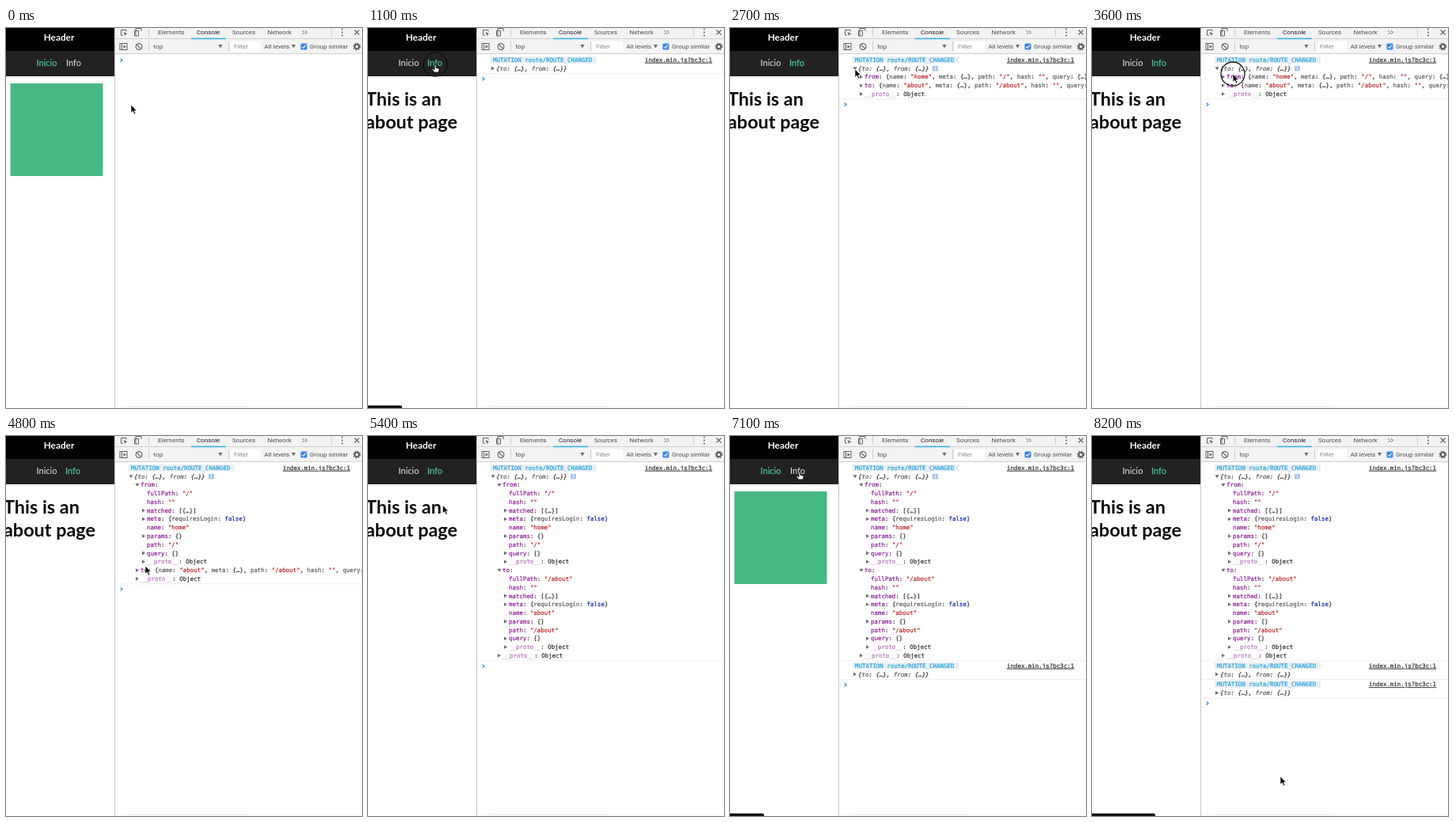
An HTML page for the animation above (8.3 s loop, 450 by 480 pixels).

```html
<!DOCTYPE html>
<html lang="es">
<head>
<meta charset="utf-8">
<title>Route log</title>
<style>
html, body { margin: 0; width: 100%; height: 100%; overflow: hidden; background: #fff; }
svg { display: block; width: 450px; height: 480px; }
text { white-space: pre; }
.page { font-family: Lato, sans-serif; font-size: 11px; }
.tools { font-family: Roboto, sans-serif; font-size: 8.1px; fill: #4a4e52; }
.log { font-family: "DejaVu Sans Mono", monospace; font-size: 7.45px; }
.log text { fill: #262626; stroke: #262626; stroke-width: .16; }
</style>
</head>
<body>
<svg viewBox="0 0 450 480" xmlns="http://www.w3.org/2000/svg">
  <rect width="450" height="480" fill="#fff"/>
  <g class="page">
    <rect width="137" height="29" fill="#000"/>
    <rect y="29" width="137" height="32" fill="#222"/>
    <text x="67" y="16" text-anchor="middle" font-size="11.8" font-weight="700" fill="#fff">Header</text>
    <text id="home" x="38.5" y="48.3">Inicio</text>
    <text id="about" y="48.3">Info</text>
    <rect id="logo" x="5.5" y="70" width="117" height="117" fill="#47b784"/>
    <g id="title" font-size="23.4" font-weight="700" fill="#080808">
      <text x="-3" y="97.5">This is an</text>
      <text x="-3" y="126.8">about page</text>
    </g>
    <path id="status" fill="#111"/>
  </g>
  <rect x="138" width="312" height="32" fill="#f3f3f3"/>
  <path d="M138 13.5H450M138 32.5H450" stroke="#cfcfcf"/>
  <path d="M137.5 0V480" stroke="#c8c8c8"/>
  <path d="M138 478.5H450" stroke="#f2f2f2"/>
  <path d="M153 478.5H305" stroke="#e6e6e6"/>
  <g class="tools">
    <path d="M180.5 1V11M411.5 1V11M180.5 17V29M281.5 17V29" stroke="#ccc"/>
    <rect x="234" y="12.6" width="44" height="1.6" fill="#3fb0e6"/>
    <text x="192" y="8.4">Elements</text>
    <text x="241" y="8.4" fill="#222">Console</text>
    <text x="286" y="8.4">Sources</text>
    <text x="330.5" y="8.4">Network</text>
    <rect x="284" y="17" width="38" height="13" fill="#fff"/>
    <text x="186.5" y="26.2">top</text>
    <text x="288" y="26.2" fill="#888">Filter</text>
    <text x="326.5" y="26.2">All levels</text>
    <text x="384" y="26.2">Group similar</text>
    <path d="M268.5 21h5l-2.5 4.5zM361 21h5l-2.5 4.5z" fill="#6a6a6a"/>
    <rect x="372.5" y="19.5" width="8" height="8" rx="1.5" fill="#3b86e8"/>
    <path d="M374.4 23.6l1.6 1.7 2.8-3.6" fill="none" stroke="#fff" stroke-width="1.1"/>
    <g fill="none" stroke="#606367">
      <path d="M152 2.5H145.5V9H148M152 2.5V4.5M164 9.5V.5H171V4M162.5 3.5H167.5V10H162.5Z"/>
      <path d="M374.5 3l2.5 2.5-2.5 2.5M378 3l2.5 2.5-2.5 2.5"/>
      <path d="M440.5 2.5l6 6M446.5 2.5l-6 6" stroke-width="1.2"/>
      <rect x="144" y="19.5" width="9" height="8"/>
      <path d="M146.5 19.5V27.5"/>
      <circle cx="168" cy="23.5" r="3.9" stroke-width="1.2"/>
      <path d="M165.3 20.8l5.4 5.4" stroke-width="1.2"/>
      <circle cx="443.5" cy="23.5" r="2.7" stroke-width="2"/>
      <circle cx="443.5" cy="23.5" r="4.2" stroke-width="1.4" stroke-dasharray="1.65"/>
    </g>
    <path d="M148.5 5l5 2.2-2.2.7-.8 2.2zM148.5 21.5l3.5 2-3.5 2z" fill="#606367"/>
    <path d="M425 1.5h.01M425 5.5h.01M425 9.5h.01" stroke="#606367" stroke-width="2" stroke-linecap="round"/>
  </g>
  <g id="log" class="log"></g>
  <circle id="ring" r="15" fill="none" stroke="#111" stroke-width="1.3"/>
  <path id="arrow" d="M0 0V10.2L2.4 8 4.2 12 5.9 11.2 4.2 7.4H7.3Z" fill="#000" stroke="#fff" stroke-width=".7"/>
  <path id="hand" d="M-1 .8Q0-.6 1 .8V4.3L4.2 5Q5.3 5.3 5 6.6L4.2 10H-1.2L-3.8 6.5Q-3.9 5.2-2.6 5.5L-1 6.8Z" fill="#fff" stroke="#111" stroke-width=".9"/>
</svg>
<script>
const LOOP = 8300, STEP = 100, PITCH = 10.78;
const el = id => document.getElementById(id);
const show = (node, on) => node.setAttribute("display", on ? "inline" : "none");

// Pointer stops: arrival time, departure time, x, y
const stops = [
  [0, 300, 158, 97], [900, 1250, 85, 46], [1800, 2700, 158, 52],
  [3300, 3900, 178, 58], [4700, 5100, 176, 164], [5600, 6500, 50, 46],
  [7000, 7500, 88, 45], [8100, LOOP, 238, 430]
];
const presses = [1000, 2300, 3500, 4900, 5600, 7200];
const [GO_INFO, OPEN_LOG, OPEN_FROM, OPEN_TO, GO_HOME, GO_BACK] = [1100, 2400, 3700, 5000, 5700, 7300];

const ease = u => u * u * (3 - 2 * u);

function pointer(t) {
  let i = stops.length - 1;
  while (stops[i][0] > t) i--;
  const [, leave, x, y] = stops[i], next = stops[i + 1];
  if (t <= leave || !next) return [x, y];
  const k = ease((t - leave) / (next[0] - leave));
  return [x + (next[2] - x) * k, y + (next[3] - y) * k];
}

const span = (s, color) => `<tspan fill="${color}" stroke="${color}">${s}</tspan>`;

function paint(s, keyed) {
  return s.replace(/"[^"]*"|\bfalse\b|\w+(?=:)/g, (m, at) => {
    if (m[0] === '"') return span(m, "#b81c20");
    if (m === "false") return span(m, "#0d22aa");
    if (m === "__proto__") return span(m, "#b46fba");
    return span(m, keyed && at === 0 ? "#881391" : "#565656");
  });
}

function marker(x, y, open) {
  const d = open ? `M${x - 0.5} ${y - 1.8}h5l-2.5 4z` : `M${x} ${y - 2.4}v4.8l4-2.4z`;
  return `<path d="${d}" fill="#6e6e6e"/>`;
}

// mark: 0 none, 1 closed, 2 open
function line(level, y, s, mark) {
  const x = 162 + level * 8;
  const style = level ? "" : ' font-style="italic"';
  return (mark ? marker(x - 6, y, mark === 2) : "") +
    `<text x="${x}" y="${y + 2.6}"${style}>${paint(s, level > 0)}</text>`;
}

function routeRows(key, name, path, open) {
  if (!open) return [[1, `${key}: {name: "${name}", meta: {…}, path: "${path}", hash: "", query: {…}}`, 1]];
  return [
    [1, `${key}:`, 2], [2, `fullPath: "${path}"`, 0], [2, 'hash: ""', 0],
    [2, "matched: [{…}]", 1], [2, "meta: {requiresLogin: false}", 1],
    [2, `name: "${name}"`, 0], [2, "params: {}", 1], [2, `path: "${path}"`, 0],
    [2, "query: {}", 1], [2, "__proto__: Object", 1]
  ];
}

function drawLog(entries, open, from, to) {
  let y = 40.2, out = "";
  for (let i = 0; i < entries; i++) {
    const wide = i === 0 && open;
    out += `<rect x="154.5" y="${y - 4.4}" width="134.5" height="8.8" fill="#eceff1"/>` +
      `<text x="158" y="${y + 2.6}">${span("MUTATION route/ROUTE_CHANGED", "#159fe3")}</text>` +
      `<text x="350" y="${y + 2.6}" text-decoration="underline">index.min.js?bc3c:1</text>`;
    const rows = [[0, "{to: {…}, from: {…}}", wide ? 2 : 1]];
    if (wide) {
      out += `<rect x="256" y="${y + 7.6}" width="7" height="6.6" rx="1" fill="#a9c3f3"/>` +
        `<path d="M259.5 ${y + 8.7}v1M259.5 ${y + 10.4}v2.7" stroke="#fff"/>`;
      rows.push(...routeRows("from", "home", "/", from),
        ...routeRows("to", "about", "/about", to), [1, "__proto__: Object", 1]);
    }
    for (const [level, s, mark] of rows) {
      y += PITCH;
      out += line(level, y, s, mark);
    }
    out += `<path d="M138 ${y + 6.5}H450" stroke="#efefef"/>`;
    y += PITCH + 2;
  }
  return out + `<path d="M144.5 ${y - 1.5}l2.6 2-2.6 2" fill="none" stroke="#3a82e8" stroke-width="1.2"/>`;
}

function setLink(id, active) {
  const color = active ? "#45c08a" : "#e6e6e6";
  el(id).setAttribute("fill", color);
  el(id).setAttribute("stroke", active ? color : "none");
  el(id).setAttribute("stroke-width", 0.25);
}

function setStatus(t) {
  const first = t >= 900 && t < 2100;
  const on = first || t >= 5600;
  show(el("status"), on);
  if (!on) return;
  const w = t >= 7400 ? 80 : 43;
  el("status").setAttribute("d", `M0 476.8H${w - 2}q2 0 2 2v1.2H0z`);
  el("status").setAttribute("opacity", first ? Math.min(1, Math.max(0, (2030 - t) / 330)) : 1);
}

let lastLog = "";

function render(t) {
  const [x, y] = pointer(t);
  const hand = y > 38 && y < 55 && ((x > 37 && x < 66) || (x > 74 && x < 97));
  const info = (t >= GO_INFO && t < GO_HOME) || t >= GO_BACK;

  setLink("home", !info);
  setLink("about", info);
  el("about").setAttribute("x", info ? 75 : 76);
  show(el("logo"), !info);
  show(el("title"), info);
  setStatus(t);

  const count = [GO_INFO, GO_HOME, GO_BACK].filter(at => t >= at).length;
  const log = drawLog(count, t >= OPEN_LOG, t >= OPEN_FROM, t >= OPEN_TO);
  if (log !== lastLog) el("log").innerHTML = lastLog = log;

  for (const id of ["arrow", "hand", "ring"]) el(id).setAttribute("transform", `translate(${x} ${y})`);
  show(el("hand"), hand);
  show(el("arrow"), !hand);
  show(el("ring"), presses.some(p => t >= p && t < p + 250));
}

const start = performance.now();
function tick() {
  const t = (performance.now() - start) % LOOP;
  render(Math.floor(t / STEP) * STEP);
  requestAnimationFrame(tick);
}
tick();
</script>
</body>
</html>
```
